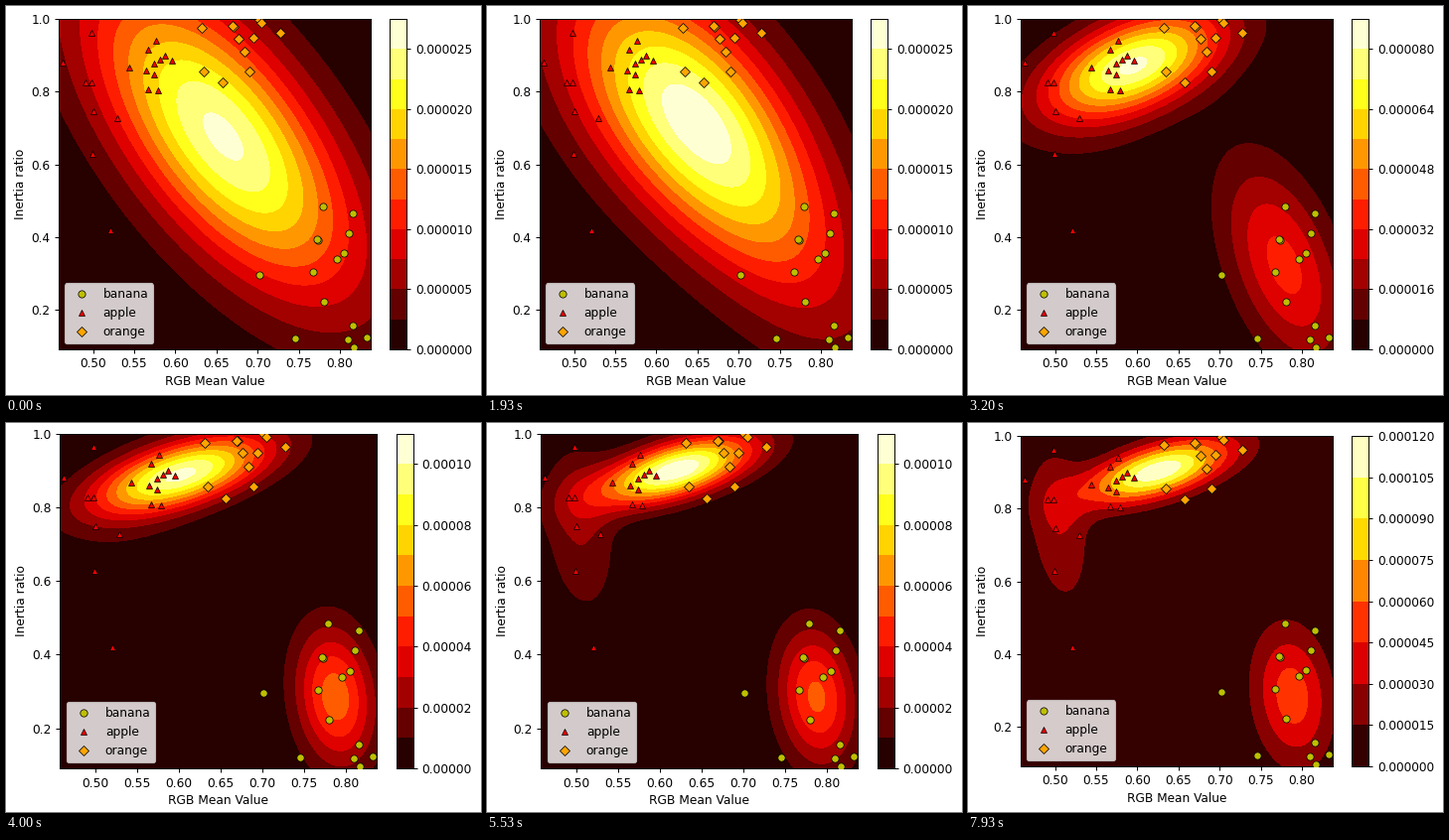
Recreate the animation shown at these times as a matplotlib script. Size 478 by 392 pixels, loop 8000 ms.

```python
import math

import matplotlib.pyplot as plt
import numpy as np
from matplotlib.animation import FuncAnimation

W, H, DPI = 478, 392, 80
FRAMES, LOOP = 120, 8000
K = 1.0875  # overall size factor for text, ticks and markers
XLIM, YLIM = (0.4583, 0.8368), (0.0906, 1.0)

for name, size in {
    "axes.linewidth": 0.8, "axes.labelpad": 4,
    "xtick.major.size": 3.5, "xtick.major.width": 0.8, "xtick.major.pad": 3.5,
    "ytick.major.size": 3.5, "ytick.major.width": 0.8, "ytick.major.pad": 3.5,
}.items():
    plt.rcParams[name] = size * K
plt.rcParams["font.family"] = "DejaVu Sans"

# The measured fruit: (RGB mean, inertia ratio)
BANANA = [(.779, .484), (.816, .465), (.811, .411), (.773, .391), (.772, .393),
          (.805, .356), (.796, .340), (.767, .304), (.702, .296), (.780, .222),
          (.816, .156), (.746, .121), (.810, .118), (.832, .123), (.817, .096)]
APPLE = [(.498, .963), (.463, .881), (.491, .826), (.498, .826), (.500, .747),
         (.529, .726), (.499, .628), (.521, .419), (.544, .867), (.567, .917),
         (.577, .941), (.565, .859), (.574, .878), (.574, .848), (.581, .889),
         (.587, .899), (.596, .885), (.567, .807), (.579, .805)]
ORANGE = [(.632, .975), (.635, .856), (.657, .825), (.671, .980), (.670, .981),
          (.677, .947), (.684, .911), (.690, .855), (.695, .948), (.702, .999),
          (.705, .990), (.728, .963)]
PTS = np.array(BANANA + APPLE + ORANGE)

# Highest density (1e-5) over the frames
PEAK_AT = (0, 29, 39, 41, 48, 53, 60, 86, 119)
PEAK = (2.56, 2.7, 2.97, 3.12, 8.2, 8.75, 10.3, 11.0, 11.6)

GX, GY = np.meshgrid(np.linspace(*XLIM, 150), np.linspace(*YLIM, 150))
STEPS = (.2, .25, .3, .4, .5, .6, .8, 1, 1.5)


def sigmoid(v):
    return 1 / (1 + np.exp(-np.clip(v, -200, 200)))


def shares(i):
    """How much of each point belongs to each of the three clusters."""
    x, y = PTS.T
    # the low right group separates from the rest ever more sharply
    low = sigmoid(math.exp((i - 41) / 10.5) * ((x - .66) / .08 - (y - .6) / .2))
    # then points left of and below the tilted main group drop out of it
    bar = 1 + 4 * math.exp((60 - i) / 17)
    below = np.maximum(.906 + .65 * (x - .627) - y, 0)
    floor = min(1 / 3, bar**2 / 600)
    left = floor + (1 - floor) * sigmoid((.535 - x) / .015 + 20 * below - bar)
    return (1 - low) * (1 - left), low, (1 - low) * left


def gaussian(w):
    """Normal density with the weighted moments of the points, times the weight."""
    total = w.sum()
    mx, my = w @ PTS / total
    d = PTS - (mx, my)
    (a, b), (_, c) = (w * d.T) @ d / total
    det = a * c - b * b
    dx, dy = GX - mx, GY - my
    q = (c * dx**2 - 2 * b * dx * dy + a * dy**2) / det
    return total * np.exp(-q / 2) / math.sqrt(det)


def density(i):
    z = sum(gaussian(w) for w in shares(i))
    return z * np.interp(i, PEAK_AT, PEAK) / z.max() + 1e-9


def nice_levels(peak):
    step = next(s for s in STEPS if peak <= 11 * s)
    return step * np.arange(math.ceil(peak / step) + 1)


def decimals(ticks):
    return max(len(f"{t * 1e-5:.7f}".rstrip("0")) - 2 for t in ticks)


fig = plt.figure(figsize=(W / DPI, H / DPI), dpi=DPI)
view = {}


def add_axes(x0, y0, x1, y1, s):
    """Axes from pixel edges, scaled by s the way the whole picture is."""
    x0, x1 = (x + (s - 1) * (x + 49) for x in (x0, x1))
    y0, y1 = (H / 2 + (y - H / 2) * s for y in (y0, y1))
    return fig.add_axes([x0 / W, 1 - y1 / H, (x1 - x0) / W, (y1 - y0) / H])


def build(places):
    """Static parts; longer colour bar labels shrink the whole picture."""
    s = 1 / (1 + 0.0141 * (places - 6))
    plt.rcParams["font.size"] = 10 * K * s
    fig.clear()
    ax = add_axes(53, 13.2, 366.6, 346, s)
    cax = add_axes(386.4, 13.2, 403.4, 346, s)
    for label, pts, marker, color, size in (("banana", BANANA, "o", "y", 6),
                                            ("apple", APPLE, "^", "red", 5.4),
                                            ("orange", ORANGE, "D", "orange", 6)):
        ax.plot(*zip(*pts), marker, color=color, label=label, zorder=3,
                ms=size * K * s, mec="black", mew=0.6 * K)
    ax.set(xlim=XLIM, ylim=YLIM, xlabel="RGB Mean Value", ylabel="Inertia ratio",
           xticks=np.arange(.5, .81, .05), yticks=np.arange(.2, 1.01, .2))
    ax.legend(loc="lower left")
    cax.set_xlim(0, 1)
    cax.set_xticks([])
    cax.yaxis.tick_right()
    view.update(places=places, ax=ax, cax=cax, parts=[])


def draw(i):
    z = density(i)
    levels = nice_levels(z.max())
    ticks = levels[::1 if len(levels) <= 10 else 2]
    places = decimals(ticks)
    if view.get("places") != places:
        build(places)
    for part in view["parts"]:
        part.remove()
    ax, cax = view["ax"], view["cax"]
    look = dict(cmap="hot", vmin=0, vmax=levels[-1])
    mids = (levels[:-1] + levels[1:]) / 2
    view["parts"] = [
        ax.contourf(GX, GY, z, levels=levels, **look),
        cax.pcolormesh([0, 1], levels, mids[:, None], **look),
    ]
    ax.set(xlim=XLIM, ylim=YLIM)
    cax.set_ylim(0, levels[-1])
    cax.set_yticks(ticks, [f"{t * 1e-5:.{places}f}" for t in ticks])
    return []


def reset():
    view.clear()
    draw(0)
    return []


anim = FuncAnimation(fig, draw, frames=FRAMES, init_func=reset,
                     interval=LOOP / FRAMES, repeat=True, repeat_delay=0)
plt.show()
```
